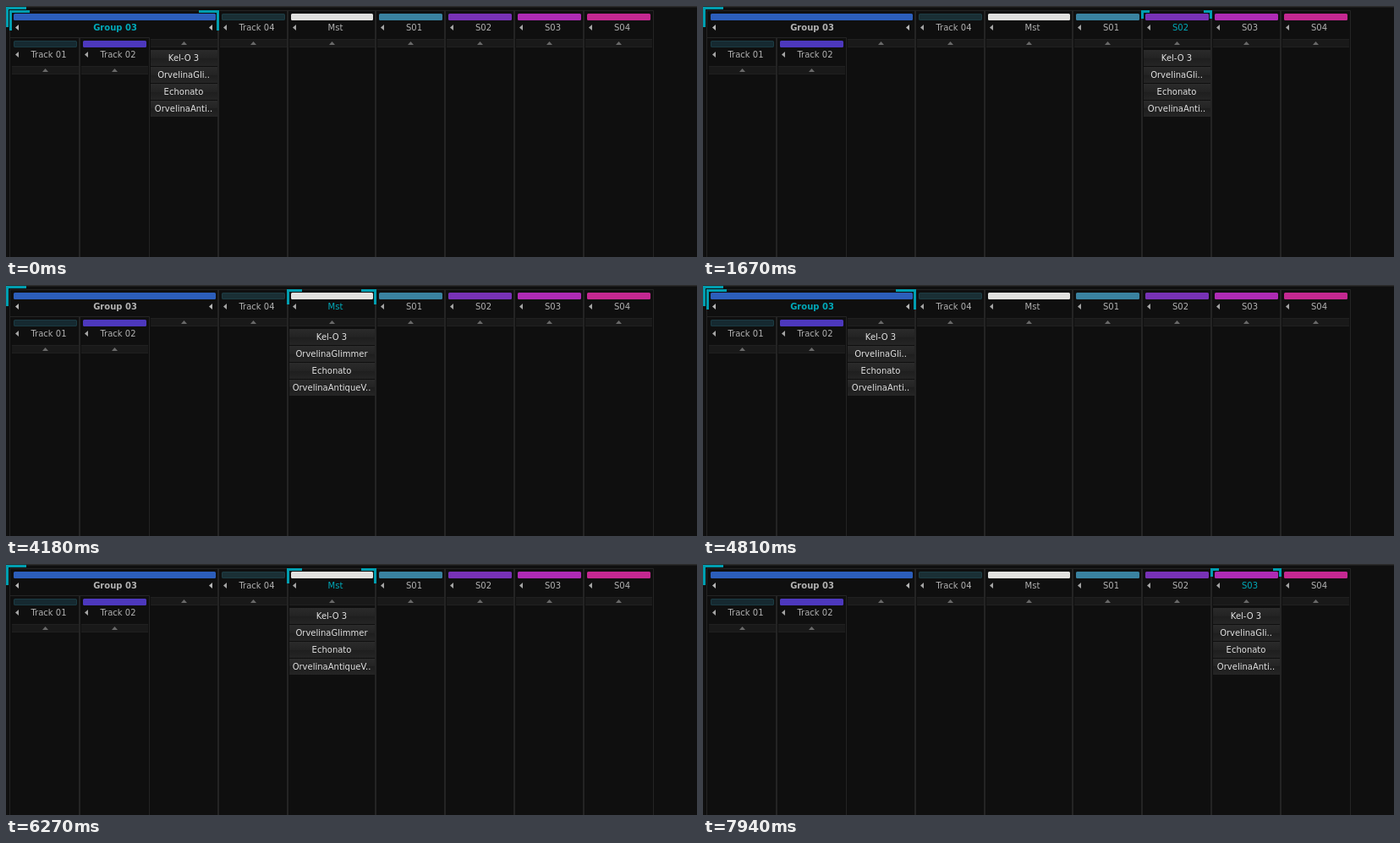
Animation, 817 px wide and 297 px high, one loop 8 s. Source, as an HTML page:

```html
<!DOCTYPE html>
<html lang="en">
<head>
<meta charset="utf-8">
<title>Mixer focus</title>
<style>
  html, body { margin: 0; width: 100%; height: 100%; overflow: hidden; background: #0f0f0f; }
  svg { display: block; width: 817px; height: 297px; }
  text { font: 10px "DejaVu Sans", sans-serif; text-anchor: middle; fill: #b2b2b2; }
  .group { font-weight: bold; }
  .plugin { fill: #e2e2e2; }
  .active { visibility: hidden; }
  .selected .active { visibility: visible; }
  .selected .title { fill: #00a9b9; }
</style>
</head>
<body>
<svg id="stage" viewBox="0 0 817 297">
  <defs>
    <linearGradient id="slot" x1="0" y1="0" x2="0" y2="1">
      <stop offset="0" stop-color="#2b2b2b"/>
      <stop offset=".5" stop-color="#232323"/>
      <stop offset=".5" stop-color="#1e1e1e"/>
      <stop offset="1" stop-color="#252525"/>
    </linearGradient>
  </defs>
</svg>
<script>
const stage = document.getElementById('stage');
const TEAL = '#009eb0';
const LOOP = 8000;
const NAMES = ['Kel-O 3', 'OrvelinaGli..', 'Echonato', 'OrvelinaAnti..'];
const WIDE_NAMES = ['Kel-O 3', 'OrvelinaGlimmer', 'Echonato', 'OrvelinaAntiqueV..'];

const strips = [
  { id: 'group', label: 'Group 03', x: 4, y: 5, w: 248, color: '#2c5ebb', corner: 24, slotX: 168 },
  { id: 't1', label: 'Track 01', x: 4, y: 37, w: 84, color: '#162a31', edge: '#1b3a42' },
  { id: 't2', label: 'Track 02', x: 86, y: 37, w: 84, color: '#4d38bd' },
  { id: 't4', label: 'Track 04', x: 250, y: 5, w: 84, color: '#1a2f35', edge: '#1d3c43' },
  { id: 'mst', label: 'Mst', x: 332, y: 5, w: 106, color: '#e0e0de', corner: 18, names: WIDE_NAMES },
  { id: 's1', label: 'S01', x: 436, y: 5, w: 84, color: '#3a82a0' },
  { id: 's2', label: 'S02', x: 518, y: 5, w: 84, color: '#7832b6' },
  { id: 's3', label: 'S03', x: 600, y: 5, w: 84, color: '#ae2bb4' },
  { id: 's4', label: 'S04', x: 682, y: 5, w: 84, color: '#c42891' }
];

const steps = [
  [0, 'group'], [630, 't4'], [1050, 'mst'], [1460, 's1'], [1670, 's2'], [2290, 's3'],
  [2500, 's4'], [2920, 't1'], [3550, 't2'], [3760, 'group'], [3970, 't4'], [4180, 'mst'],
  [4600, 't4'], [4810, 'group'], [5020, 't2'], [5220, 't1'], [5850, 't2'], [6060, 't4'],
  [6270, 'mst'], [6890, 't4'], [7520, 's1'], [7730, 's2'], [7940, 's3']
];

function add(parent, tag, attrs, text) {
  const node = document.createElementNS(stage.namespaceURI, tag);
  for (const key in attrs) node.setAttribute(key, attrs[key]);
  if (text) node.textContent = text;
  return parent.appendChild(node);
}

const rect = (parent, x, y, width, height, fill, more) =>
  add(parent, 'rect', { x, y, width, height, fill, ...more });
const path = (parent, d, fill) => add(parent, 'path', { d, fill });

function drawFrame({ x, y, w }) {
  add(stage, 'path', {
    d: `M${x + .5} 298V${y + .5}H${x + w - .5}V298`,
    fill: 'none', stroke: '#242424'
  });
}

function drawCorners(parent, { x, y, w, corner = 10 }) {
  add(parent, 'path', {
    class: 'active', fill: 'none', stroke: TEAL, 'stroke-width': 3,
    d: `M${x + 1.5} ${y + corner}V${y + 1.5}H${x + corner}` +
       `M${x + w - corner} ${y + 1.5}H${x + w - 1.5}V${y + corner}`
  });
}

function drawSlots(parent, { x, y, w, slotX, names = NAMES }) {
  const left = (slotX ?? x) + 3;
  const width = x + w - 2 - left;
  const mid = left + width / 2 - .5;
  const top = y + 34;
  rect(parent, left, top, width, 10, '#191919');
  rect(parent, left, top, width, 1, '#202020');
  rect(parent, left, top + 9, width, 1, '#202020');
  path(parent, `M${mid - 3} ${top + 7}l3.5 -4l3.5 4z`, '#696969');

  const list = add(parent, 'g', { class: 'active' });
  names.forEach((name, i) => {
    const slotY = top + 13 + i * 20;
    rect(list, left, slotY, width, 19, 'url(#slot)');
    add(list, 'text', { class: 'plugin', x: mid, y: slotY + 13 }, name);
  });
}

function drawStrip(strip) {
  const { id, label, x, y, w, color, edge } = strip;
  const isGroup = id === 'group';
  const g = add(stage, 'g', {});
  drawCorners(g, strip);
  rect(g, x + 5, y + 4, w - 9, 8, color, { rx: 1.5 });
  if (edge) {
    rect(g, x + 5.5, y + 4.5, w - 10, 7, 'none', { rx: 1.5, stroke: edge });
  }
  const arrowColor = isGroup ? '#b8b8b8' : '#a5a5a5';
  const arrow = ax => path(g, `M${ax} ${y + 20.5}l4 -3.5v7z`, arrowColor);
  arrow(x + 7);
  if (isGroup) arrow(x + w - 12);
  add(g, 'text', {
    class: isGroup ? 'title group' : 'title',
    x: x + w / 2 + (isGroup ? 1 : 4.5), y: y + 24
  }, label);
  drawSlots(g, strip);
  return g;
}

rect(stage, 0, 0, 817, 1.5, '#2c2c2c');
strips.forEach(drawFrame);
path(stage, 'M0 1H24V4H3V25H0z', TEAL);
const nodes = strips.map(drawStrip);

let current;
function render(now) {
  const time = now % LOOP;
  const selected = steps.findLast(([start]) => start <= time)[1];
  if (selected !== current) {
    current = selected;
    strips.forEach(({ id }, i) => nodes[i].classList.toggle('selected', id === selected));
  }
}

const origin = performance.now();
function tick() {
  render(performance.now() - origin);
  requestAnimationFrame(tick);
}
tick();
</script>
</body>
</html>
```
